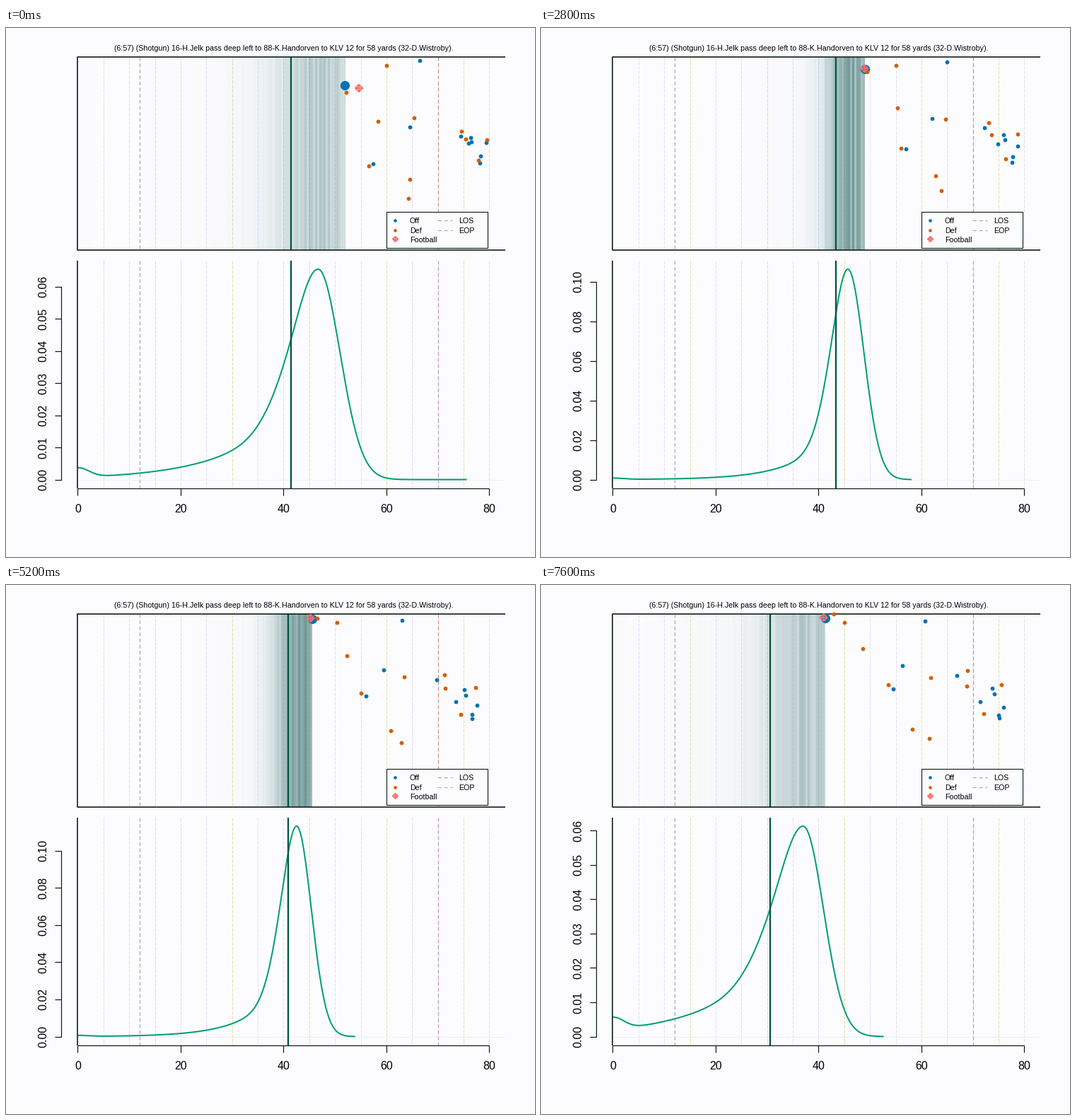
Recreate the animation shown at these times as a matplotlib script. Size 748 by 748 pixels, loop 8 s.

```python
import numpy as np
import matplotlib.pyplot as plt
from matplotlib.animation import FuncAnimation

SIZE, DPI = 748, 64
PX = 72 / DPI                       # points per pixel
LEFT, RIGHT, YARD = 101.5, 706.5, 7.275
TOP, BOTTOM = 41, 313.5             # field panel
PLOT_TOP, PLOT_BOTTOM = 329, 651    # density panel
BASE, PEAK_PX = 638.5, 297.5
GREEN, BLUE, ORANGE, CORAL = "#009e73", "#0072b2", "#d55e00", "#f4716c"
INK, PAPER, TINT = "#0a1a10", "#fcfcfe", (.02, .30, .29)

FRAMES, STEP_MS = 20, 400

# The forecast at a few moments: densest yard, its density, and the mean yard
MOMENTS = [0, 4, 7, 11, 15, 17, 19]
MODE = [46.7, 46.2, 45.7, 44.0, 40.9, 39.4, 37.0]
PEAK = [.0654, .0814, .1064, .1194, .1019, .0896, .0613]
MEAN = [41.4, 42.0, 43.4, 42.7, 38.4, 35.7, 30.6]

# Each runner: start and total shift
OFFENSE = [
    ((585, 46), (-42, 5)), ((571, 140), (-60, -26)), ((519, 192), (-21, -45)),
    ((643, 153), (-55, -25)), ((657, 155), (-19, -9)), ((658, 161), (-17, -7)),
    ((654, 163), (-33, 2)), ((679, 162), (-25, 11)), ((671, 181), (-24, 3)),
    ((670, 191), (-22, -3)),
]
DEFENSE = [
    ((538, 53), (-109, 0)), ((526, 132), (-71, -42)), ((577, 127), (-26, 4)),
    ((513, 195), (-22, -54)), ((571, 214), (-46, -10)), ((569, 241), (-20, -24)),
    ((644, 146), (-41, -25)), ((650, 157), (-48, -14)), ((680, 158), (-29, -17)),
    ((668, 187), (-42, -5)),
]
YARDS = np.linspace(0, 83, 800)
BAND_X = (np.arange(605) + .5) / YARD


def smooth(t, ys):
    """Cubic curve through the values at MOMENTS."""
    xs, ys = np.array(MOMENTS, float), np.array(ys)
    slopes = np.gradient(ys, xs)
    i = min(np.searchsorted(xs, t, side="right") - 1, len(xs) - 2)
    h = xs[i + 1] - xs[i]
    u = (t - xs[i]) / h
    return (ys[i] * (1 + 2 * u) * (1 - u) ** 2 + ys[i + 1] * u * u * (3 - 2 * u)
            + h * u * (1 - u) * (slopes[i] * (1 - u) - slopes[i + 1] * u))


def glide(start, shift, bend, u):
    return np.array(start) + np.array(shift) * u + np.array(bend) * u * (1 - u)


def runners(team, u):
    """Everyone speeds up to the left and eases off sideways."""
    return [glide(start, shift, (19, .4 * shift[1]), u) for start, shift in team]


def density(t):
    """Lopsided bell with an exponential left tail and a bump at the goal line."""
    mode, peak = smooth(t, MODE), smooth(t, PEAK)
    left = .35 / peak
    right = 1.5 + .165 / peak - .025 * (t - 9)
    gap = mode - YARDS
    bell = np.exp(-.5 * (gap / np.where(gap > 0, left, right)) ** 2)
    weight = .32 + .0025 * (t - 9) ** 2
    tail = weight * np.exp(-np.maximum(gap, 0) * peak / .8) * (1 - bell) ** 2
    goal = .045 * (.0654 / peak) ** 4 * np.exp(-(YARDS / 3) ** 2)
    height = bell + np.where(gap > 0, tail, 0) + goal
    last = mode + 4 * right + 12 * np.exp(-t)
    return peak, last, height / height.max()


def px(yard):
    return LEFT + YARD * yard


fig = plt.figure(figsize=(SIZE / DPI, SIZE / DPI), dpi=DPI, facecolor=PAPER)
ax = fig.add_axes([0, 0, 1, 1])
ax.axis("off")


def line(xs, ys, color=INK, width=1.2, z=2, **kw):
    return ax.plot(xs, ys, color=color, lw=width * PX, zorder=z,
                   solid_capstyle="butt", **kw)[0]


def label(x, y, text, size, **kw):
    return ax.text(x, y, text, fontsize=size * PX, color="black", va="baseline",
                   family="Liberation Sans", zorder=9, **kw)


def dots(color, radius, z, points=((0, 0),)):
    return ax.scatter(*np.transpose(points), s=(2 * radius * PX) ** 2,
                      color=color, lw=0, zorder=z)


def football(x, y, r):
    nan = np.nan
    dx = np.array([0, 1, 0, -1, 0, nan, -1, 1, nan, 0, 0])
    dy = np.array([-1, 0, 1, 0, -1, nan, 0, 0, nan, -1, 1])
    return x + r * dx, y + r * dy


# Yard lines
for top, bottom, end_color in ((TOP, BOTTOM, "#d0957f"),
                               (PLOT_TOP, PLOT_BOTTOM, "#b99cc6")):
    for yard in range(5, 85, 5):
        color = "#e3e3ac" if yard % 15 == 0 else "#dfdffa"
        line([px(yard)] * 2, [top, bottom], color, 1, 1, dashes=(5, 1.5))
    for yard, color in ((12, "#b8a8b4"), (70, end_color)):
        line([px(yard)] * 2, [top, bottom], color, 1.3, 1, dashes=(4, 2.6))
line([LEFT, RIGHT], [BASE] * 2, "#e2e2fb", 1, 1, dashes=(2, 2))

# Frames and the yard axis
line([RIGHT, LEFT, LEFT, RIGHT], [TOP, TOP, BOTTOM, BOTTOM], width=1.6, z=4)
line([LEFT] * 2, [PLOT_TOP, PLOT_BOTTOM], width=1.6, z=4)
line([LEFT, px(80)], [PLOT_BOTTOM] * 2)
for yard in range(0, 81, 20):
    line([px(yard)] * 2, [PLOT_BOTTOM, 660.5])
    label(px(yard), 685, str(yard), 16, ha="center")

label(393, 31.5, "(6:57) (Shotgun) 16-H.Jelk pass deep left to 88-K.Handorven "
      "to KLV 12 for 58 yards (32-D.Wistroby).", 10.67, ha="center")

# Legend
ax.add_patch(plt.Rectangle((538.5, 259.5), 143, 51.5, fc=PAPER, ec=INK,
                           lw=1.1 * PX, zorder=5))
for y, name in ((272, "Off"), (285.5, "Def"), (298.5, "Football")):
    label(571, y + 4, name, 10.67)
dots(BLUE, 2.3, 6, [(550.5, 272)])
dots(ORANGE, 2.3, 6, [(550.5, 285.5)])
line(*football(550.5, 298.5, 3.8), CORAL, 1.5, 6)
for y, color, name in ((272, "#b5a8b0", "LOS"), (285.5, "#b9a8cc", "EOP")):
    line([610.5, 631], [y] * 2, color, 1.2, 6, dashes=(4.5, 3))
    label(640, y + 4, name, 10.67)

# Moving parts
band = ax.imshow(np.zeros((1, len(BAND_X), 4)), extent=(LEFT, RIGHT, BOTTOM, TOP),
                 aspect="auto", interpolation="nearest", zorder=1.5)
curve = line([], [], GREEN, 2, 3)
means = [line([], [], "#005540", 2.3, 3.5) for _ in range(2)]
value_axis = line([], [])
value_labels = [label(57, 0, "", 16, ha="center", rotation=90, rotation_mode="anchor")
                for _ in range(9)]
carrier = dots(BLUE, 6.6, 6)
offense, defense = dots(BLUE, 2.9, 7), dots(ORANGE, 2.9, 7)
ball = line([], [], CORAL, 1.9, 8)
ax.set_xlim(0, SIZE)
ax.set_ylim(SIZE, 0)


def draw_values(peak):
    step = .01 if peak < .07 else .02
    spacing = step / peak * PEAK_PX
    count = int((BASE - PLOT_TOP) / spacing) + 1
    ys = BASE - spacing * np.arange(count)
    xs, path = [78.5, 78.5], [BASE, ys[-1]]
    for y in ys:
        xs += [np.nan, 69, 78.5]
        path += [np.nan, y, y]
    value_axis.set_data(xs, path)
    for i, text in enumerate(value_labels):
        text.set_visible(i < count)
        if i < count:
            text.set_y(ys[i])
            text.set_text(f"{i * step:.2f}")


def draw_band(t, peak, height, edge):
    """Streaky shading up to the carrier, with the curve's overshoot folded back."""
    level = np.interp(BAND_X, YARDS, height)
    level += .7 * np.interp(2 * edge - BAND_X, YARDS, height)
    streaks = np.random.default_rng(t).uniform(.75, 1.25, len(BAND_X) // 3 + 1)
    alpha = 4 * peak * level ** 1.25 * np.repeat(streaks, 3)[:len(BAND_X)]
    rgba = np.empty((1, len(BAND_X), 4))
    rgba[..., :3] = TINT
    rgba[..., 3] = np.where(BAND_X <= edge, np.clip(alpha, 0, .7), 0)
    band.set_data(rgba)


def update(t):
    peak, last, height = density(t)
    shown = YARDS <= last
    curve.set_data(px(YARDS[shown]), BASE - PEAK_PX * height[shown])
    draw_values(peak)

    x = px(smooth(t, MEAN))
    means[0].set_data([x, x], [TOP, BOTTOM])
    means[1].set_data([x, x], [PLOT_TOP, PLOT_BOTTOM])

    u = t / (FRAMES - 1)
    lead = glide((479.5, 80.5), (-77.5, -33.5), (30, -45), u)
    chaser = lead + (2 + 10 * u * u, 10.5 - 16.5 * u)
    flight = np.exp(-t / 2.8)
    carrier.set_offsets([lead])
    offense.set_offsets(runners(OFFENSE, u))
    defense.set_offsets(runners(DEFENSE, u) + [chaser])
    ball.set_data(*football(lead[0] - 2.5 + 22 * flight, lead[1] - 1 + 5.5 * flight, 5.2))
    draw_band(t, peak, height, (lead[0] + .8 - LEFT) / YARD)
    return []


anim = FuncAnimation(fig, update, frames=FRAMES, interval=STEP_MS,
                     init_func=lambda: update(0), repeat=True, repeat_delay=0)
plt.show()
```
